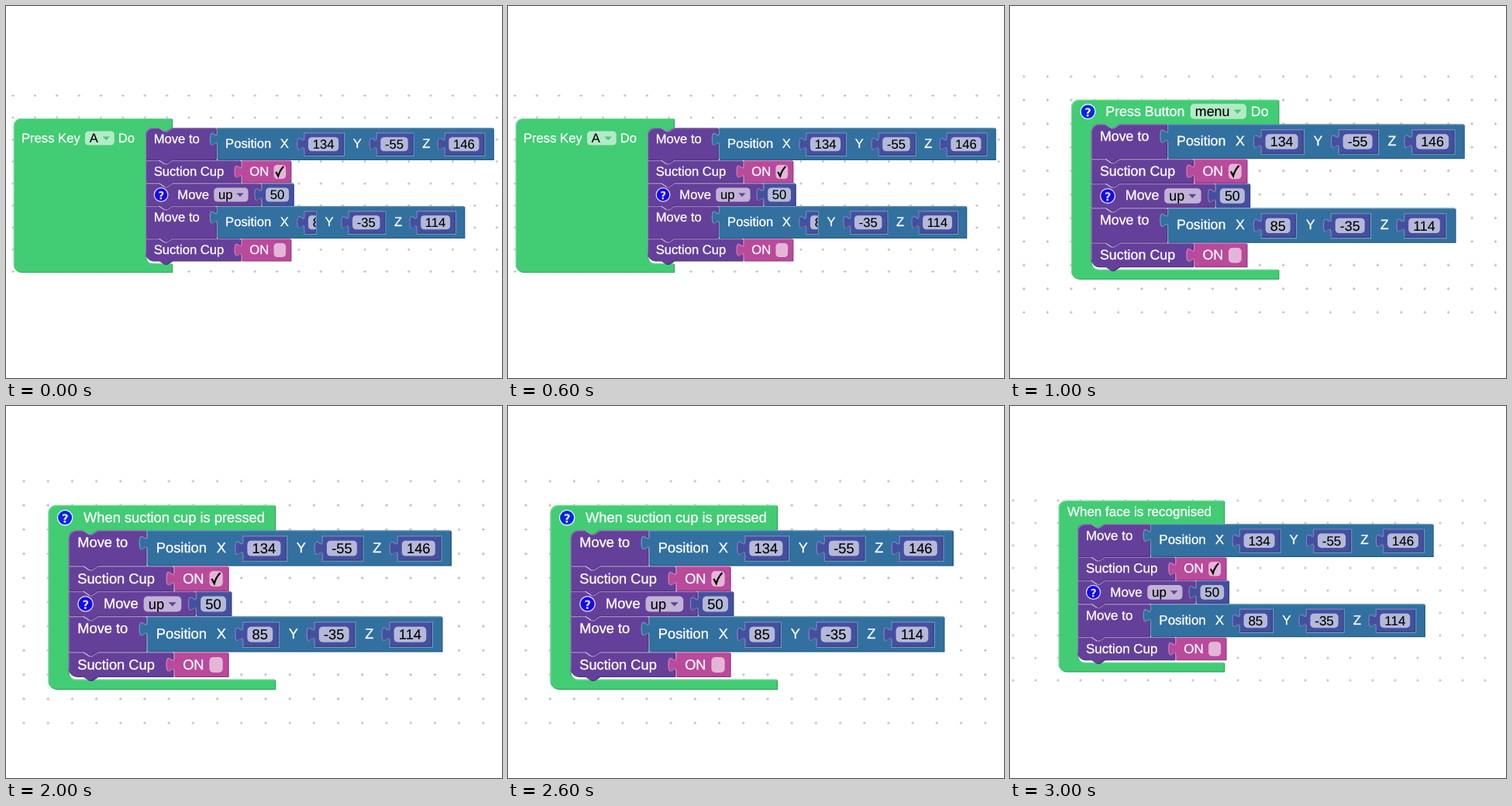
Recreate the animation shown at these times as an HTML page. Size 640 by 480 pixels, loop 4000 ms.

```html
<!DOCTYPE html>
<html lang="en">
<head>
<meta charset="utf-8">
<title>Robot arm blocks</title>
<style>
  html, body { margin: 0; width: 100%; height: 100%; overflow: hidden; background: #fff; }
  svg { display: block; width: 640px; height: 480px; }
  text {
    font: 14.67px "Liberation Sans", Arial, sans-serif;
    fill: #fff;
    stroke: #fff;
    stroke-width: .25px;
    text-rendering: geometricPrecision;
    white-space: pre;
  }
  .value { fill: #000; stroke: #000; stroke-width: .1px; }
  .field { fill: #fff; fill-opacity: .6; }
  .edge { fill: none; stroke: #fff; stroke-opacity: .3; }
  .shade { fill: #000; fill-opacity: .2; }
  .icon { opacity: .82; }
  .scene { opacity: 0; animation: show 4s step-end infinite; }
  @keyframes show {
    0% { opacity: 1; }
    25%, 100% { opacity: 0; }
  }
</style>
</head>
<body>
<svg id="stage" viewBox="0 0 640 480" xmlns="http://www.w3.org/2000/svg"></svg>
<script>
const GREEN = '#42cc74', PURPLE = '#65409a', BLUE = '#3270a0', NAVY = '#44509f', PINK = '#ba4a9b';
const NOTCH_IN = 'l6,4 3,0 6,-4', NOTCH_OUT = 'l-6,4 -3,0 -6,-4';
const TAB = 'c0,-10 -8,8 -8,-7.5 s8,2.5 8,-7.5';
const FIELD_H = 16;

const label = (x, y, s, cls = '') => `<text class="${cls}" x="${x}" y="${y}">${s}</text>`;
const field = (x, y, w) => `<rect class="field" x="${x}" y="${y}" width="${w}" height="${FIELD_H}" rx="4"/>`;

// a pair of ones is kerned tighter
const numWidth = s => [...s].reduce((w, c) => w + (c === '-' ? 4.88 : 8.16), s.includes('11') ? -1.09 : 0);

// lead runs up the left side and along the top, tail closes the outline
function solid(lead, tail, color) {
  const d = lead + tail + 'z';
  return `<path d="${d}" fill="${color}" transform="translate(1 1)"/>` +
    `<path class="shade" d="${d}" transform="translate(1 1)"/>` +
    `<path d="${d}" fill="${color}"/>` +
    `<path class="edge" d="${lead}" transform="translate(.5 .5)"/>`;
}

function statement(y, w, h, first, last) {
  const lead = `M0,${y + h - (last ? 8 : 0)}V` +
    (first ? `${y + 8}a8,8 0 0 1 8,-8` : y) + `H15${NOTCH_IN}H${w}`;
  const tail = `v${h}H30${NOTCH_OUT}` + (last ? 'H8a8,8 0 0 1 -8,-8' : 'H0');
  return solid(lead, tail, PURPLE);
}

function plug(x, y, w, h, color) {
  return solid(`M${x},${y + h}V${y + 20}${TAB}V${y}H${x + w}`, `v${h}`, color);
}

function help(cx, cy) {
  return `<g class="icon" transform="translate(${cx} ${cy}) scale(1.08) translate(-8 -8)">
    <circle cx="8" cy="8" r="7.2" fill="#00f" stroke="#fff"/>
    <path fill="#fff" d="m6.8,10h2c0.003,-0.617 0.271,-0.962 0.633,-1.266 2.875,-2.405 0.607,-5.534 -3.765,-3.874v1.7c3.12,-1.657 3.698,0.118 2.336,1.25 -1.201,0.998 -1.201,1.528 -1.204,2.19z"/>
    <rect fill="#fff" x="6.8" y="10.8" width="2" height="2"/></g>`;
}

function dropdown(x, y, w, s, color) {
  return field(x, y, w) + label(x + 5, y + 13, s, 'value') +
    `<path fill="${color}" d="M${x + w - 13.4},${y + 6.2}h8.2l-4.1,4.2z"/>`;
}

// cut limits the visible width of a number block
function number(x, y, s, cut) {
  const fw = numWidth(s) + 10, w = cut || fw + 11;
  const out = `<path class="edge" d="M${x},${y + 26.5}h${w + .5}v-26.5"/>` + plug(x, y, w - 1, 25, NAVY);
  const body = field(x + 5, y + 5.2, fw) + label(x + 10, y + 18.4, s, 'value');
  const svg = cut
    ? `<svg x="${x}" y="${y}" width="${cut}" height="26" viewBox="${x} ${y} ${cut} 26" overflow="hidden">${body}</svg>`
    : body;
  return [out + svg, w];
}

function moveTo(y, nums, cut, first) {
  let x = 180, inner = label(90.8, y + 22.8, 'Position') + label(153.2, y + 22.8, 'X');
  nums.forEach((n, i) => {
    const [svg, w] = number(x, y + 5.5, n, i ? 0 : cut);
    inner += svg;
    x += w;
    if (i < 2) {
      inner += label(x + 10.4, y + 22.8, 'YZ'[i]);
      x += i ? 35.4 : 36.7;
    }
  });
  return statement(y, 80, 36, first) + label(9.4, y + 17.7, 'Move to') +
    plug(81, y, x + 11 - 82, 36, BLUE) + inner;
}

function suction(y, on, last) {
  const tick = `<path d="M148.2,${y + 13.2}L150.8,${y + 18}Q152.6,${y + 11.5} 157,${y + 7}" fill="none" stroke="#000" stroke-width="1.9"/>`;
  return statement(y, 108, 25, false, last) + label(9.4, y + 17.7, 'Suction Cup') +
    plug(109, y, 56, 25, PINK) + label(118.3, y + 17.7, 'ON') +
    `<rect class="field" x="145.8" y="${y + 5.2}" width="13.8" height="${FIELD_H}" rx="4"/>` + (on ? tick : '');
}

function moveUp(y) {
  return statement(y, 130.7, 25) + help(17.7, y + 13.2) + label(36.4, y + 17.7, 'Move') +
    dropdown(77.8, y + 5.2, 39, 'up', PURPLE) + number(131.7, y, '50')[0];
}

function frame(l, t, r) {
  const b = 164;
  return solid(`M${l},${b - 8}V${t + 8}a8,8 0 0 1 8,-8H${r}`,
    `V0H30${NOTCH_OUT}H8a8,8 0 0 0 -8,8V146a8,8 0 0 0 8,8H${r}V${b}H${l + 8}a8,8 0 0 1 -8,-8`, GREEN) +
    `<path class="edge" d="M2.5,151.8Q5,154.5 8,154.5H${r}"/>`;
}

function dots(x0, y0, cols, rows, step, s) {
  let d = '';
  const a = 1.5 * s;
  for (let r = 0; r < rows; r++)
    for (let c = 0; c < cols; c++)
      d += `M${x0 + c * step - a},${y0 + r * step}h${2 * a}m${-a},${-a}v${2 * a}`;
  return `<path d="${d}" stroke="#c0c0c0" stroke-width="${s}" fill="none"/>`;
}

const scenes = [
  { x: 180, y: 157, s: 1.135, grid: [9, 115.6, 23, 9], box: [-150, -10.6, 30], cut: 13.6,
    head: label(-141, 17, 'Press Key') + dropdown(-68.7, 3.9, 33.3, 'A', GREEN) + label(-31, 17, 'Do') },
  { x: 104.5, y: 152.3, s: 1.217, grid: [18, 91, 21, 11], box: [-21, -26, 198.6],
    head: help(-3.3, -13.2) + label(15.4, -8.3, 'Press Button') +
      dropdown(105.4, -21.4, 59.3, 'menu', GREEN) + label(169.5, -8.3, 'Do') },
  { x: 80.5, y: 160.3, s: 1.248, grid: [23, 97, 20, 11], box: [-21, -26, 213.5],
    head: help(-3.5, -13) + label(15.7, -8.3, 'When suction cup is pressed') },
  { x: 87, y: 152, s: 1.16, grid: [4, 122, 22, 9], box: [-21, -26, 163],
    head: label(-11.3, -8.8, 'When face is recognised') }
];

document.getElementById('stage').innerHTML = scenes.map((c, i) =>
  `<g class="scene" style="animation-delay:${i ? i - 4 : 0}s">` +
  dots(...c.grid, 25 * c.s, c.s) +
  `<g transform="translate(${c.x} ${c.y}) scale(${c.s})">` +
  frame(...c.box) + c.head +
  moveTo(0, ['134', '-55', '146'], 0, true) +
  suction(37, true) +
  moveUp(63) +
  moveTo(89, ['85', '-35', '114'], c.cut) +
  suction(126, false, true) +
  '</g></g>').join('');
</script>
</body>
</html>
```
